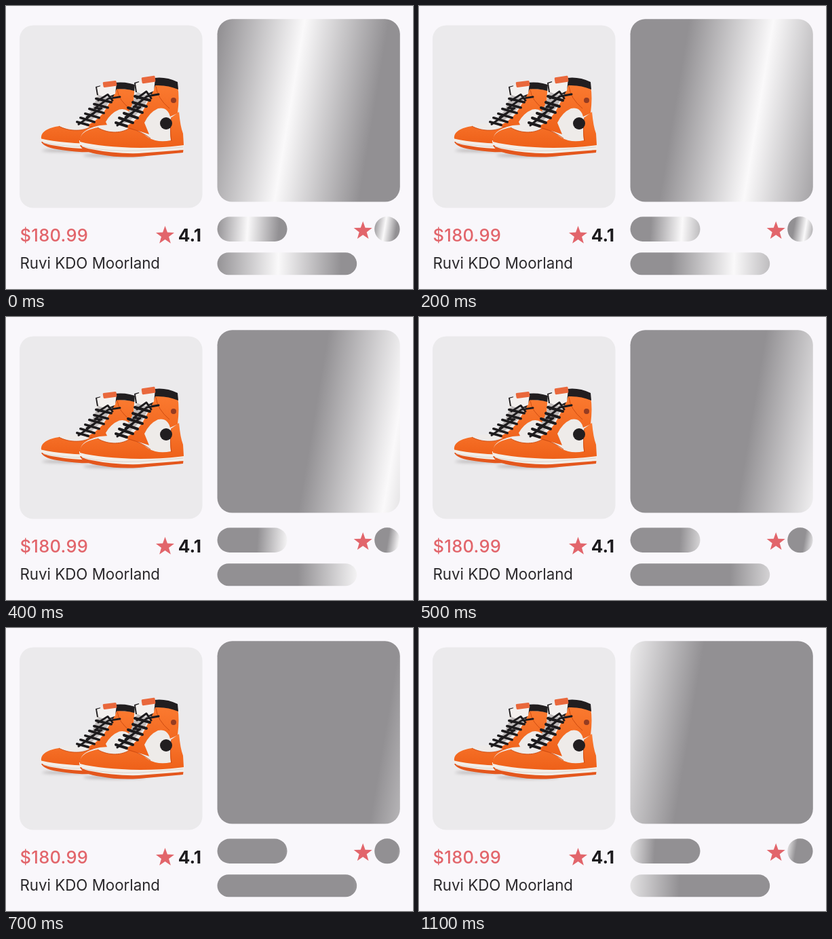
Write an HTML page that moves like this. It is 600x417 px and loops after 1200 ms.

```html
<!DOCTYPE html>
<html lang="en">
<head>
<meta charset="utf-8">
<title>Product card with loading skeleton</title>
<style>
  html, body { margin: 0; width: 100%; height: 100%; overflow: hidden; background: #f9f7fb; }
  svg { display: block; width: 600px; height: 417px; }
  text { font-family: Inter, "Liberation Sans", sans-serif; }
</style>
</head>
<body>
<svg id="stage" viewBox="0 0 600 417" xmlns="http://www.w3.org/2000/svg">
  <defs>
    <linearGradient id="leather" x1="0" y1="0" x2="0" y2="1">
      <stop offset="0" stop-color="#fb7a30"/>
      <stop offset="1" stop-color="#ee6019"/>
    </linearGradient>
    <filter id="soft" x="-20%" y="-100%" width="140%" height="300%">
      <feGaussianBlur stdDeviation="2"/>
    </filter>
    <polygon id="star" fill="#e2656b"/>

    <g id="shoe">
      <!-- sole -->
      <path fill="#e4571d" d="M109 205Q112 215 140 219Q166 224 196 222L261 216L262 207Z"/>
      <path fill="#f3eee8" d="M108 198Q107 208 126 211Q160 218 196 217L262 212L263 203L190 205Z"/>
      <path fill="none" stroke="#d5cec8" stroke-width=".8" d="M112 207Q150 215 196 213L261 208"/>
      <!-- upper -->
      <path fill="#eeebe9" d="M110 199C108 187 120 180 138 176L164 174Q182 162 188 142L190 114Q204 107 219 105L253 113Q256 122 252 146Q256 178 261 190L262 205Q200 213 110 199Z"/>
      <path fill="url(#leather)" d="M109 200C108 188 119 182 135 179C148 187 168 189 182 180Q198 184 210 194Q224 202 243 198Q241 184 244 164L255 156Q257 178 261 188L262 205Q232 209 198 209Q140 208 109 200Z"/>
      <path fill="url(#leather)" d="M175 178Q190 172 201 156L214 132L219 116L253 119Q256 133 253 158L242 163Q238 148 224 151Q211 157 204 172L211 189Q197 184 184 182Z"/>
      <path fill="none" stroke="#c9480f" stroke-width=".9" d="M135 179C148 187 168 189 182 180Q200 185 213 195M221 118Q223 136 241 151M244 164Q241 184 244 199"/>
      <path fill="#bdb9b9" d="M191 130L205 122L214 128L202 150L181 171L166 174Q184 158 191 130Z"/>
      <!-- collar and tongue -->
      <path fill="#211e20" d="M219 106Q236 104 253 112L254 123Q238 116 220 117L215 130L191 127L189 113L196 111L198 124L214 122Z"/>
      <path fill="#f3f0ee" d="M191 114Q206 108 220 107L218 125L205 131L193 127Z"/>
      <rect x="200" y="104" width="20" height="9" rx="1.5" fill="#e9683c" transform="rotate(-8 210 108)"/>
      <!-- laces -->
      <g fill="none" stroke="#1d1b1d" stroke-width="4" stroke-linecap="round" stroke-linejoin="round">
        <path d="M162 172L178 177M167 165L187 172M174 158L194 165M180 150L201 157M187 142L207 148M190 133L212 139"/>
        <path stroke-width="3" d="M164 176L187 157L176 164L198 149L188 149L208 133L225 130M193 136L207 126L214 136"/>
      </g>
      <circle cx="236" cy="173" r="9" fill="#211e20"/>
      <circle cx="247" cy="139" r="4" fill="#943c22"/>
    </g>
  </defs>

  <rect width="600" height="417" fill="#f9f7fb"/>
  <rect x="20" y="28.5" width="269.5" height="269" rx="20" fill="#ebeaec"/>
  <g fill="#756d6d" opacity=".45" filter="url(#soft)">
    <ellipse cx="87" cy="213" rx="34" ry="2"/>
    <ellipse cx="160" cy="220" rx="46" ry="2.5"/>
  </g>
  <use href="#shoe" transform="translate(-57 19.5) scale(1 .88)"/>
  <use href="#shoe"/>

  <text x="20.5" y="346.5" font-size="25.5" font-weight="500" letter-spacing=".3" fill="#e2656b">$180.99</text>
  <text x="288" y="346.5" font-size="26" font-weight="700" text-anchor="end" fill="#1d1b1e">4.1</text>
  <text x="20.5" y="387.3" font-size="22.3" fill="#2a282b">Ruvi KDO Moorland</text>
  <use href="#star" x="234.5" y="338.3"/>
  <use href="#star" x="526.2" y="331.5"/>
</svg>
<script>
const NS = 'http://www.w3.org/2000/svg';
const STEP = 100, STEPS = 12, RESTART = 8;
const stage = document.getElementById('stage');

function add(parent, tag, attrs) {
  const node = document.createElementNS(NS, tag);
  for (const key in attrs) node.setAttribute(key, attrs[key]);
  return parent.appendChild(node);
}

document.getElementById('star').setAttribute('points',
  Array.from({ length: 10 }, (_, i) => {
    const radius = i % 2 ? 5.8 : 14.2, angle = (i / 5 - 0.5) * Math.PI;
    return [radius * Math.cos(angle), radius * Math.sin(angle)].map(v => v.toFixed(2));
  }).join(' '));

// Each placeholder has its own sheen, scaled to its box.
function placeholder(x, y, width, height, rx, index) {
  const id = 'sheen' + index;
  const gradient = add(stage, 'linearGradient', {
    id, gradientUnits: 'userSpaceOnUse',
    x1: x - width, y1: y, x2: x + 2 * width, y2: y + height / 2
  });
  [[0.35, '#929093'], [0.5, '#faf9fa'], [0.65, '#929093']].forEach(([offset, color]) =>
    add(gradient, 'stop', { offset, 'stop-color': color }));
  add(stage, 'rect', { x, y, width, height, rx, fill: `url(#${id})` });
  return { gradient, width };
}

const placeholders = [
  [311.5, 19.3, 269.3, 269.3, 22],
  [311.5, 310.5, 103, 36.5, 18.2],
  [543.2, 310.3, 37.4, 37, 18.5],
  [311.5, 363.2, 205.7, 33, 16.5]
].map((box, i) => placeholder(...box, i));

// Sheen offset as a share of the box width.
function sweep(step) {
  return step < RESTART
    ? -0.062 + 0.158 * step - 0.0025 * step * step
    : -0.96 + 0.121 * (step - RESTART);
}

function render(time) {
  const shift = sweep(Math.floor(time / STEP) % STEPS);
  for (const { gradient, width } of placeholders)
    gradient.setAttribute('gradientTransform', `translate(${shift * width} 0)`);
}

const start = performance.now();
function tick(now) {
  render(Math.max(0, now - start));
  requestAnimationFrame(tick);
}
render(0);
requestAnimationFrame(tick);
</script>
</body>
</html>
```
